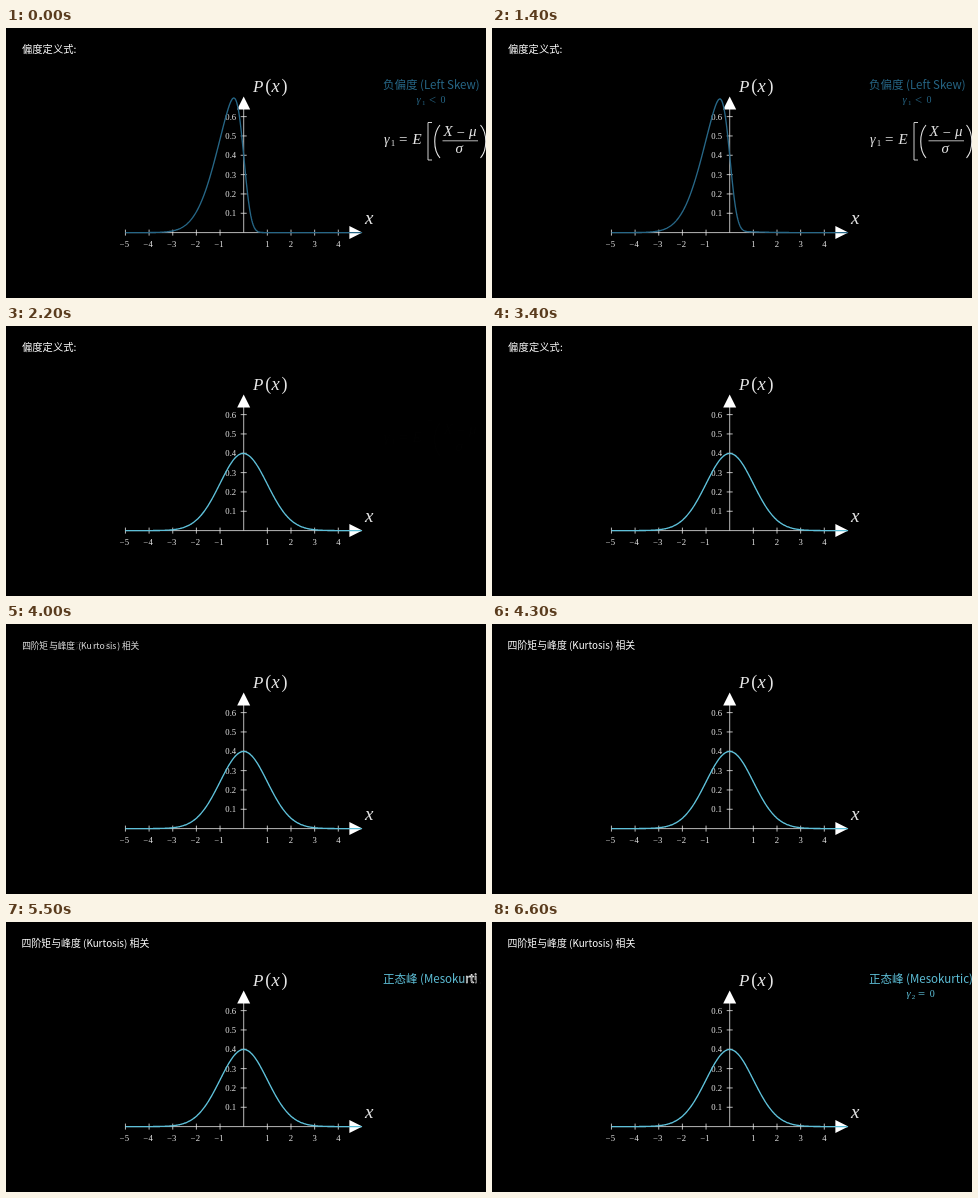
An HTML page with a canvas for the animation above (8000 ms loop, 480 by 270 pixels).

```html
<!DOCTYPE html>
<html lang="zh-CN">
<head>
<meta charset="utf-8">
<title>偏度与峰度</title>
<style>
html, body { margin: 0; width: 100%; height: 100%; overflow: hidden; background: #000; }
canvas { display: block; width: 480px; height: 270px; }
</style>
</head>
<body>
<canvas id="stage" width="480" height="270"></canvas>
<script>
const ctx = document.getElementById('stage').getContext('2d');
const LOOP = 8000, STEP = 100;
const ORIGIN = { x: 237.7, y: 204.6 }, UNIT = { x: 23.65, y: 193.3 };
const WHITE = [255, 255, 255], DARK = [38, 102, 134], LIGHT = [94, 192, 217];
const INK = '#e6e6e6';

const sans = size => `${size}px "Noto Sans CJK SC", "Noto Sans CJK", sans-serif`;
const serif = size => `${size}px "Liberation Serif", serif`;
const italic = size => 'italic ' + serif(size);

const lerp = (a, b, p) => a + (b - a) * p;
const clamp = v => Math.min(1, Math.max(0, v));
const mix = (a, b, p) => `rgb(${a.map((v, i) => Math.round(lerp(v, b[i], p)))})`;
const rgb = c => mix(c, c, 0);
const sigmoid = v => 1 / (1 + Math.exp(-v));
const EDGE = sigmoid(-5);
const smooth = p => clamp((sigmoid(10 * (clamp(p) - 0.5)) - EDGE) / (1 - 2 * EDGE));
const progress = (t, start, span) => clamp((t - start) / span);

function text(str, x, y, font, color = INK, align = 'left') {
  ctx.font = font;
  ctx.fillStyle = color;
  ctx.textAlign = align;
  ctx.fillText(str, x, y);
}

function path(points, width, color = INK) {
  ctx.beginPath();
  points.forEach(([x, y]) => ctx.lineTo(x, y));
  ctx.strokeStyle = color;
  ctx.lineWidth = width;
  ctx.stroke();
}

function triangle(...points) {
  ctx.beginPath();
  points.forEach(([x, y]) => ctx.lineTo(x, y));
  ctx.fillStyle = '#fff';
  ctx.fill();
}

// Splits a line into separately placed characters, without the spaces.
function glyphs(str, x, y, font) {
  ctx.font = font;
  return [...str].map((ch, i) => ({
    ch, y, font,
    x: x + ctx.measureText(str.slice(0, i)).width,
    width: ctx.measureText(ch).width
  })).filter(g => g.ch !== ' ');
}

const oldTitle = glyphs('偏度定义式:', 16, 25, sans(10.3));
const newTitle = glyphs('四阶矩与峰度 (Kurtosis) 相关', 15.6, 25, sans(9.9));
const mesokurtic = [
  ...glyphs('正态峰 (Mesokurtic)', 377, 61, sans(11.5)),
  { ch: 'γ', x: 414.5, y: 75, font: italic(10.5) },
  { ch: '2', x: 419.8, y: 76.5, font: serif(7) },
  { ch: '=', x: 426, y: 75.5, font: serif(12.5) },
  { ch: '0', x: 437.8, y: 75, font: serif(10) }
];

function drawAxes() {
  const { x: ox, y: oy } = ORIGIN, w = 0.8;
  path([[119.3, oy], [346, oy]], w);
  path([[ox, oy], [ox, 80]], w);
  triangle([356.4, oy], [343.4, oy - 6.5], [343.4, oy + 6.5]);
  triangle([ox, 68.6], [ox - 6.5, 81.6], [ox + 6.5, 81.6]);
  for (let n = -5; n <= 4; n++) {
    if (!n) continue;
    const x = ox + n * UNIT.x;
    path([[x, oy - 3], [x, oy + 3]], w);
    text(n < 0 ? '−' + -n : n, x - (n < 0 ? 1 : 0), 219, serif(8.7), INK, 'center');
  }
  for (let n = 1; n <= 6; n++) {
    const y = oy - n * UNIT.y / 10;
    path([[ox - 3, y], [ox + 3, y]], w);
    text('0.' + n, 230.2, y + 2.9, serif(8.7), INK, 'right');
  }
  text('P', 247, 64, italic(17));
  text('(', 259.3, 63.5, serif(18));
  text('x', 265.4, 64, italic(18.5));
  text(')', 275.5, 63.5, serif(18));
  text('x', 359, 195.5, italic(19));
}

const bell = x => Math.exp(-x * x / 2) / Math.sqrt(2 * Math.PI);

// Cumulative normal distribution, Abramowitz–Stegun approximation.
function cumulative(x) {
  const k = 1 / (1 + 0.2316419 * Math.abs(x));
  const tail = bell(x) * k * (0.31938153 + k * (-0.356563782 +
    k * (1.781477937 + k * (-1.821255978 + k * 1.330274429))));
  return x > 0 ? 1 - tail : tail;
}
const leftSkew = x => 2 * bell(x) * cumulative(-4 * x);

function drawCurve(p) {
  const points = [];
  for (let i = -200; i <= 200; i++) {
    const x = i / 40, y = lerp(leftSkew(x), bell(x), p);
    points.push([ORIGIN.x + x * UNIT.x, ORIGIN.y - y * UNIT.y]);
  }
  path(points, 1.35, mix(DARK, LIGHT, p));
}

function bigParen(x, bulge) {
  ctx.beginPath();
  ctx.moveTo(x, 97);
  ctx.bezierCurveTo(x - bulge, 105, x - bulge, 122, x, 130);
  ctx.lineWidth = 1.1;
  ctx.strokeStyle = INK;
  ctx.stroke();
}

function drawSkewNotes(alpha) {
  if (alpha <= 0) return;
  const blue = rgb(DARK);
  ctx.globalAlpha = alpha;
  text('负偏度 (Left Skew)', 377, 61, sans(11.5), blue);
  text('γ', 410.5, 75, italic(10.5), blue);
  text('1', 416, 76.5, serif(7), blue);
  text('<', 423, 75.5, serif(12.5), blue);
  text('0', 434.5, 75, serif(10), blue);

  text('γ', 378, 115.5, italic(14));
  text('1', 384.8, 117.5, serif(9));
  text('=', 393, 116, serif(15));
  text('E', 406.5, 116, italic(15));
  path([[426, 94.5], [422, 94.5], [422, 132], [426, 132]], 0.9);
  bigParen(434, 7);
  text('X', 437.5, 108, italic(15));
  text('−', 450.5, 108.5, serif(14.5));
  text('μ', 463, 108, italic(15));
  path([[436.5, 112.8], [472, 112.8]], 0.8);
  text('σ', 449.5, 124.5, italic(15));
  bigParen(474.5, -7);
  ctx.globalAlpha = 1;
}

function scaledGlyph(g, x, y, scale, alpha) {
  ctx.save();
  ctx.globalAlpha = alpha;
  ctx.translate(x, y);
  ctx.scale(scale, scale);
  text(g.ch, -g.width / 2, 4, g.font, '#fff');
  ctx.restore();
}

// Each old character splits into several new ones; shapes contract midway.
function drawTitle(p) {
  if (p <= 0 || p >= 1) {
    (p <= 0 ? oldTitle : newTitle).forEach(g => text(g.ch, g.x, g.y, g.font, '#fff'));
    return;
  }
  const copies = newTitle.length / oldTitle.length;
  const scale = 1 - p * (1 - p);
  newTitle.forEach((to, i) => {
    const from = oldTitle[Math.floor(i / copies)];
    const x = lerp(from.x + from.width / 2, to.x + to.width / 2, p);
    if (i % copies === 0) scaledGlyph(from, x, from.y - 4, scale, 1 - p);
    scaledGlyph(to, x, to.y - 4, scale, p);
  });
}

// Each character is outlined in white, then filled with its colour.
function drawWriting(list, p, color) {
  const lag = 0.2, total = 1 + (list.length - 1) * lag;
  list.forEach((g, i) => {
    const local = clamp(p * total - i * lag);
    if (local <= 0) return;
    const outline = smooth(local * 2), fill = smooth(local * 2 - 1);
    ctx.globalAlpha = fill;
    text(g.ch, g.x, g.y, g.font, mix(WHITE, color, fill));
    ctx.globalAlpha = 1;
    if (fill >= 1) return;
    ctx.strokeStyle = mix(WHITE, color, fill);
    ctx.lineWidth = Math.max(0.01, 0.7 * (1 - fill));
    ctx.setLineDash(outline < 1 ? [outline * 36, 1000] : []);
    ctx.strokeText(g.ch, g.x, g.y);
    ctx.setLineDash([]);
  });
}

function draw(t) {
  ctx.fillStyle = '#000';
  ctx.fillRect(0, 0, 480, 270);
  const reshape = smooth(progress(t, 1280, 1000));
  drawAxes();
  drawCurve(reshape);
  drawSkewNotes(1 - reshape);
  drawTitle(smooth(progress(t, 3320, 1000)));
  drawWriting(mesokurtic, progress(t, 4360, 2000), LIGHT);
}

function tick() {
  const t = performance.now() % LOOP;
  draw(Math.floor(t / STEP) * STEP);
  requestAnimationFrame(tick);
}
tick();
</script>
</body>
</html>
```
